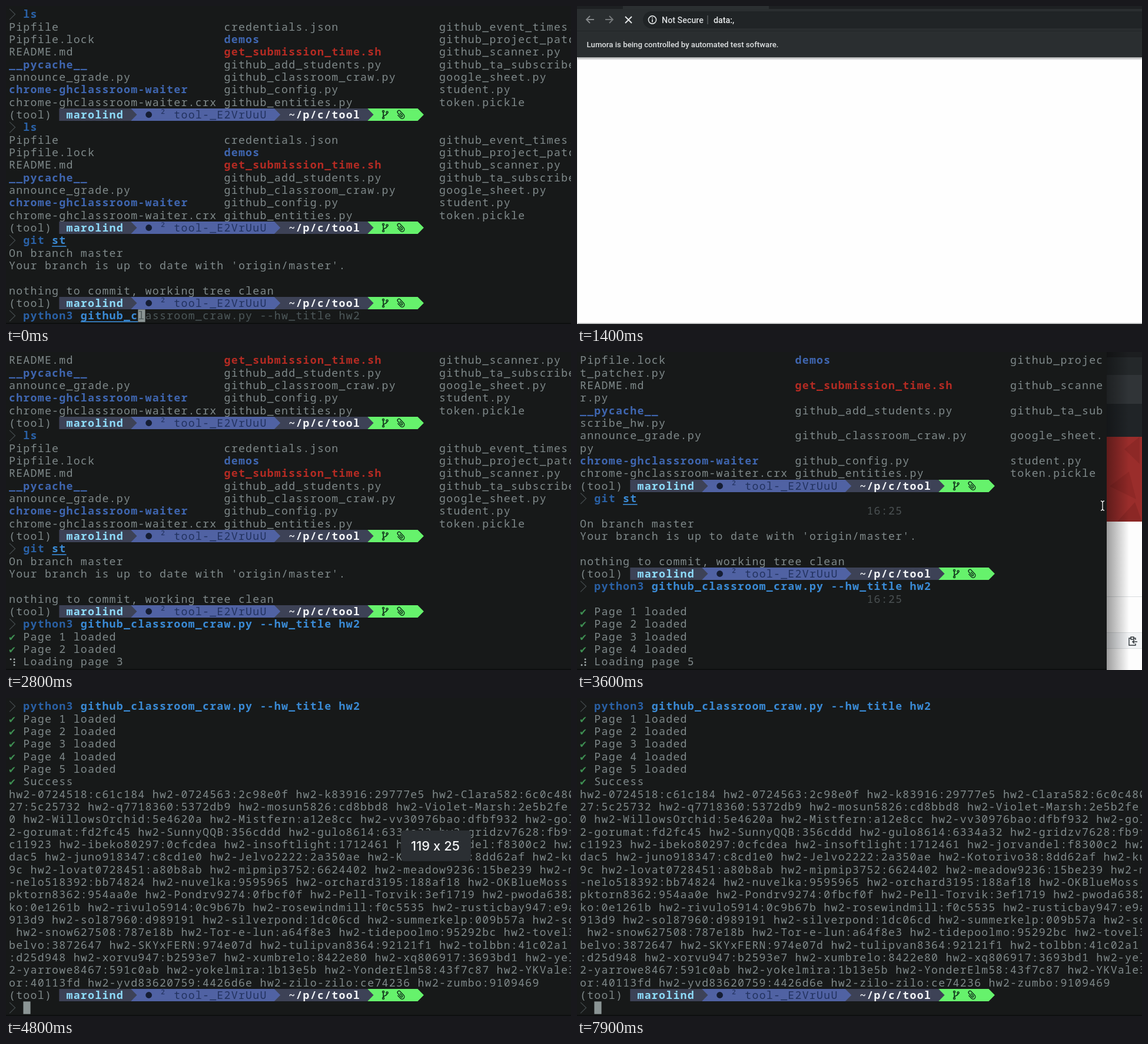
Recreate the animation shown at these times as an HTML page with a canvas. Size 960 by 540 pixels, loop 8000 ms.

```html
<!DOCTYPE html>
<html lang="en">
<head>
<meta charset="utf-8">
<title>Classroom crawl</title>
<style>
html, body { margin: 0; width: 100%; height: 100%; overflow: hidden; background: #171919; }
canvas { display: block; width: 960px; height: 540px; }
</style>
</head>
<body>
<canvas id="stage" width="960" height="540"></canvas>
<script>
const ctx = document.getElementById('stage').getContext('2d');
const LOOP = 8000, CW = 12.185, RH = 21.333, X0 = 5, Y0 = 3.35, ROWS = 25, WIDE = 119;
const MONO = '"Noto Sans Mono", "DejaVu Sans Mono", monospace';
const SANS = 'Roboto, "Liberation Sans", sans-serif';
const TIP_FONT = 'Inter, "Liberation Sans", sans-serif';
const BG = '#171919', NAVY = '#22325f', SLATE = '#3d4256', INDIGO = '#5062a3', LIME = '#66f26c';

const STYLES = {
  text: ['#7f898a', 400], dir: ['#3f66b0', 700], run: ['#b52b23', 700],
  cmd: ['#2a61a6', 700], arg: ['#3a8bd6', 700], link: ['#3a8bd6', 700],
  hint: ['#4d585a', 400], time: ['#4b5153', 400], ok: ['#3e8f52', 400]
};

// Times of the main events, in ms
const ACCEPT = 200, ENTER = 500, BROWSER_IN = 1200, BROWSER_OUT = 2100;
const PAGES = [2100, 2600, 3000, 3400, 4000];
const NARROW = 3100, DRAG = 3800, DRAG_END = 4300, DONE = 4300, TIP_OUT = 5100;

const FILES = [
  ['Pipfile', 'credentials.json', 'github_event_times.py'],
  ['Pipfile.lock', 'demos', 'github_project_patcher.py'],
  ['README.md', 'get_submission_time.sh', 'github_scanner.py'],
  ['__pycache__', 'github_add_students.py', 'github_ta_subscribe_hw.py'],
  ['announce_grade.py', 'github_classroom_craw.py', 'google_sheet.py'],
  ['chrome-ghclassroom-waiter', 'github_config.py', 'student.py'],
  ['chrome-ghclassroom-waiter.crx', 'github_entities.py', 'token.pickle']
];

const OUTPUT = `hw2-0724518:c61c184 hw2-0724563:2c98e0f hw2-k83916:29777e5 hw2-Clara582:6c0c480
27:5c25732 hw2-q7718360:5372db9 hw2-mosun5826:cd8bbd8 hw2-Violet-Marsh:2e5b2fe
0 hw2-WillowsOrchid:5e4620a hw2-Mistfern:a12e8cc hw2-vv30976bao:dfbf932 hw2-gol
2-gorumat:fd2fc45 hw2-SunnyQQB:356cddd hw2-gulo8614:6334a32 hw2-gridzv7628:fb9f
c11923 hw2-ibeko80297:0cfcdea hw2-insoftlight:1712461 hw2-jorvandel:f8300c2 hw2
dac5 hw2-juno918347:c8cd1e0 hw2-Jelvo2222:2a350ae hw2-Kotorivo38:8dd62af hw2-ku
9c hw2-lovat0728451:a80b8ab hw2-mipmip3752:6624402 hw2-meadow9236:15be239 hw2-m
-nelo518392:bb74824 hw2-nuvelka:9595965 hw2-orchard3195:188af18 hw2-OKBlueMoss:
pktorn8362:954aa0e hw2-Pondrv9274:0fbcf0f hw2-Pell-Torvik:3ef1719 hw2-pwoda6382
ko:0e1261b hw2-rivulo5914:0c9b67b hw2-rosewindmill:f0c5535 hw2-rusticbay947:e9a
913d9 hw2-sol87960:d989191 hw2-silverpond:1dc06cd hw2-summerkelp:009b57a hw2-so
 hw2-snow627508:787e18b hw2-Tor-e-lun:a64f8e3 hw2-tidepoolmo:95292bc hw2-tovel3
belvo:3872647 hw2-SKYxFERN:974e07d hw2-tulipvan8364:92121f1 hw2-tolbbn:41c02a1
:d25d948 hw2-xorvu947:b2593e7 hw2-xumbrelo:8422e80 hw2-xq806917:3693bd1 hw2-yel
2-yarrowe8467:591c0ab hw2-yokelmira:1b13e5b hw2-YonderElm58:43f7c87 hw2-YKVale3
or:40113fd hw2-yvd83620759:4426d6e hw2-zilo-zilo:ce74236 hw2-zumbo:9109469`.split('\n');

// A row is a list of parts: [column, text or draw function, style]
const plain = s => [[0, s, 'text']];
const command = (...parts) => [[0, chevron], ...parts, [113, '16:25', 'time']];
const prompt = () => [[0, drawPrompt]];

function styleOf(name) {
  if (name.endsWith('.sh')) return 'run';
  return /^(demos|__pycache__|.*-waiter)$/.test(name) ? 'dir' : 'text';
}
const listing = FILES.map(names => names.map((n, i) => [i * 30, n, styleOf(n)]));

const history = [
  command([2, 'ls', 'cmd']), ...listing, prompt(),
  command([2, 'ls', 'cmd']), ...listing, prompt(),
  command([2, 'git', 'cmd'], [6, 'st', 'link']),
  plain('On branch master'),
  plain("Your branch is up to date with 'origin/master'."),
  [], plain('nothing to commit, working tree clean'), prompt()
];

function buildRows(t) {
  const rows = history.slice();
  if (t < ACCEPT) {
    rows.push(command([2, 'python3', 'cmd'], [10, 'github_c', 'link'],
      [18, 'lassroom_craw.py --hw_title hw2', 'hint'], [18, caret('l')]));
    return rows;
  }
  const parts = [[2, 'python3', 'cmd'], [10, 'github_classroom_craw.py --hw_title hw2', 'arg']];
  if (t < ENTER) parts.push([49, caret('')]);
  rows.push(command(...parts));
  if (t < ENTER) return rows;

  const loaded = PAGES.filter(p => t >= p).length;
  for (let i = 1; i <= loaded; i++) rows.push([[0, '✔', 'ok'], [2, `Page ${i} loaded`, 'text']]);
  if (loaded < PAGES.length) {
    rows.push([[0, spinner(t)], [2, `Loading page ${loaded + 1}`, 'text']]);
  } else if (t >= DONE) {
    rows.push([[0, '✔', 'ok'], [2, 'Success', 'text']], ...OUTPUT.map(plain),
      prompt(), command([2, caret('')]));
  }
  return rows;
}

function wrap(rows, cols) {
  const out = [];
  for (const row of rows) {
    const lines = [[]];
    for (const [col, item, style] of row) {
      let c = col, rest = item;
      do {
        const n = Math.floor(c / cols), at = c % cols;
        while (lines.length <= n) lines.push([]);
        const piece = typeof rest === 'string' ? rest.slice(0, cols - at) : rest;
        lines[n].push([at, piece, style]);
        if (typeof rest !== 'string') break;
        rest = rest.slice(piece.length);
        c += piece.length;
      } while (rest);
    }
    out.push(...lines);
  }
  return out;
}

function rect(x, y, w, h, color) {
  ctx.fillStyle = color;
  ctx.fillRect(x, y, w, h);
}
function poly(points, color) {
  ctx.fillStyle = color;
  ctx.beginPath();
  points.forEach(([x, y]) => ctx.lineTo(x, y));
  ctx.fill();
}
function stroke(path, color, width) {
  ctx.strokeStyle = color;
  ctx.lineWidth = width;
  ctx.stroke(new Path2D(path));
}
function disc(x, y, r, color) {
  ctx.fillStyle = color;
  ctx.beginPath();
  ctx.arc(x, y, r, 0, 7);
  ctx.fill();
}
function label(s, x, y, size, color, family = SANS, align = 'left') {
  ctx.font = `500 ${size}px ${family}`;
  ctx.letterSpacing = '0px';
  ctx.textAlign = align;
  ctx.fillStyle = color;
  ctx.fillText(s, x, y);
}
function mono(s, x, top, color, weight) {
  ctx.textAlign = 'left';
  ctx.font = `${weight} 18.2px ${MONO}`;
  ctx.letterSpacing = '0px';
  ctx.letterSpacing = CW - ctx.measureText('0').width + 'px';
  ctx.fillStyle = color;
  ctx.fillText(s, x, top + 17);
}

function chevron(x, y) {
  stroke(`M${x + 1} ${y + 1.5}L${x + 10.5} ${y + 10.7}L${x + 1} ${y + 20}`, '#42494b', 1.3);
}
const caret = ch => (x, y) => {
  rect(x, y, CW, RH, '#8b9595');
  if (ch) mono(ch, x, y, '#4f5a5c', 400);
};
// Braille dots 1-6 as bits, column by column
const spinner = t => (x, y) => {
  const steps = [0b001011, 0b011001, 0b111001, 0b111000, 0b111100, 0b110100, 0b100110, 0b100111, 0b000111, 0b001111];
  const bits = steps[(Math.floor(t / 65) + 9) % 10];
  for (let i = 0; i < 6; i++) {
    if (bits >> i & 1) disc(x + 3 + (i > 2 ? 6 : 0), y + 6.5 + i % 3 * 4.8, 1.5, '#a2acac');
  }
};

function drawPrompt(x, y) {
  const at = c => x + c * CW, top = Math.round(y), b = Math.round(y + RH), mid = (top + b) / 2;
  const segment = (from, to, color) =>
    poly([[at(from), top], [at(to), top], [at(to + 0.85), mid], [at(to), b], [at(from), b]], color);
  mono('(tool)', x, y, STYLES.text[0], 400);
  segment(50, 57, LIME);
  segment(37, 50, SLATE);
  segment(17, 37, INDIGO);
  segment(7, 17, SLATE);
  mono('marolind', at(8), y, '#8edcfb', 700);
  disc(at(19.5), mid, 5.4, '#151d33');
  mono('²', at(21), y, NAVY, 400);
  mono('tool-_E2VrUuU', at(23), y, NAVY, 400);
  mono('~/p/c/tool', at(39), y, '#f3f5f7', 700);

  ctx.save();
  ctx.translate(at(52.45), mid);
  stroke('M-3 -4V4M3.5 -3C3.5 2 -3 0 -3 4', '#12351c', 1.7);
  for (const [dx, dy] of [[-3, -5.5], [-3, 5.5], [3.5, -4]]) {
    disc(dx, dy, 2.3, '#12351c');
    disc(dx, dy, 0.8, LIME);
  }
  ctx.translate(at(54.6) - at(52.45), 0);
  ctx.rotate(-0.75);
  stroke('M-3.8 -3V4A3.8 3.8 0 0 0 3.8 4V-5A2.6 2.6 0 0 0 -1.4 -5V3A1.3 1.3 0 0 0 1.3 3V-3', '#12351c', 1.5);
  ctx.restore();
}

function drawTerminal(t, width) {
  const cols = Math.min(WIDE, Math.floor((width - 10) / CW + 0.1));
  rect(0, 0, width, 540, BG);
  rect(0, 538, width, 2, '#0d0f0f');
  wrap(buildRows(t), cols).slice(-ROWS).forEach((line, i) => {
    const y = Y0 + i * RH;
    for (const [col, item, style] of line) {
      const x = X0 + col * CW;
      if (typeof item === 'function') { item(x, y); continue; }
      const [color, weight] = STYLES[style];
      mono(item, x, y, color, weight);
      if (style === 'link') rect(x, y + 20, item.length * CW, 1.6, color);
    }
  });
  return cols;
}

function drawBehind(edge) {
  rect(0, 0, 960, 540, '#fdfdfd');
  rect(0, 0, 960, 9, '#1c1e20');
  rect(0, 9, 960, 79, '#303437');
  rect(0, 9, 960, 30, '#24282a');
  rect(0, 88, 960, 56, '#202427');
  rect(0, 144, 960, 144, '#9a2d2b');
  poly([[930, 165], [956, 144], [956, 190]], '#8d2826');
  poly([[905, 228], [938, 203], [950, 250]], '#8f2826');
  poly([[918, 288], [948, 255], [960, 288]], '#8b2725');
  for (const y of [415, 476, 503]) rect(0, y, 960, 1, '#d9dcde');
  rect(0, 477, 960, 26, '#f2f4f6');
  stroke('M942 486H938V498H949V495M945 486H949V489M941 484H946V488H941ZM952 492H944M947 489L944 492L947 495', '#30363a', 1.4);
  const shade = ctx.createLinearGradient(edge, 0, edge + 38, 0);
  shade.addColorStop(0, 'rgba(0,0,0,.38)');
  shade.addColorStop(1, 'rgba(0,0,0,0)');
  ctx.fillStyle = shade;
  ctx.fillRect(edge, 0, 38, 540);
}

function drawPointer(x, y) {
  const d = `M${x - 3} ${y - 8}Q${x} ${y - 8} ${x} ${y - 5}V${y + 5}Q${x} ${y + 8} ${x - 3} ${y + 8}` +
    `M${x + 3} ${y - 8}Q${x} ${y - 8} ${x} ${y - 5}M${x} ${y + 5}Q${x} ${y + 8} ${x + 3} ${y + 8}`;
  stroke(d, '#111', 3);
  stroke(d, '#e8eaea', 1.4);
}

function drawTip(cols, width) {
  const x = width / 2;
  ctx.fillStyle = '#2b2f33';
  ctx.beginPath();
  ctx.roundRect(x - 59, 225, 119, 52, 5);
  ctx.fill();
  label(`${cols} x ${ROWS}`, x - 0.5, 259, 22, '#f2f4f5', TIP_FONT, 'center');
}

function drawBrowser() {
  rect(0, 0, 960, 540, '#fefefe');
  rect(0, 0, 960, 5, '#1d2022');
  rect(78, 0, 248, 5, '#2b2f31');
  rect(0, 5, 960, 82, '#2a2e30');
  ctx.fillStyle = '#202426';
  ctx.beginPath();
  ctx.roundRect(112, 9, 900, 29, 14.5);
  ctx.fill();
  rect(0, 42, 960, 1, '#212527');
  const shade = ctx.createLinearGradient(0, 87, 0, 92);
  shade.addColorStop(0, '#a5a7a8');
  shade.addColorStop(1, '#fefefe');
  ctx.fillStyle = shade;
  ctx.fillRect(0, 87, 960, 5);
  rect(0, 538.5, 960, 1.5, '#a9abac');
  rect(0, 87, 1, 453, '#dcdde0');

  stroke('M29 23H16M22 17L16 23L22 29', '#85898b', 1.8);
  stroke('M48 23H61M55 17L61 23L55 29', '#74787a', 1.8);
  stroke('M82 18L93 29M93 18L82 29', '#e6e8e9', 1.9);
  ctx.strokeStyle = '#dfe2e3';
  ctx.lineWidth = 1.6;
  ctx.beginPath();
  ctx.arc(128, 23.5, 6.6, 0, 7);
  ctx.stroke();
  rect(127.2, 22.5, 1.7, 5, '#dfe2e3');
  rect(127.2, 19.4, 1.7, 1.7, '#dfe2e3');
  label('Not Secure', 144, 28.5, 14.3, '#dadddf');
  rect(221.5, 16, 1, 15, '#717679');
  label('data:,', 232, 28.5, 14.3, '#e8eaeb');
  label('Lumora is being controlled by automated test software.', 16.5, 70, 13.2, '#dfe2e3');
}

function windowWidth(t) {
  if (t < NARROW || t >= DRAG_END) return 1460;
  if (t < DRAG) return 900;
  const p = (t - DRAG) / (DRAG_END - DRAG);
  return 900 + 560 * p * p * (3 - 2 * p);
}

function draw(t) {
  if (t >= BROWSER_IN && t < BROWSER_OUT) return drawBrowser();
  const width = windowWidth(t);
  if (width < 960) drawBehind(width);
  const cols = drawTerminal(t, width);
  if (t >= DRAG && t < TIP_OUT) drawTip(cols, width);
  if (t >= NARROW && t < DRAG_END) drawPointer(width - 7, 261);
}

function tick() {
  draw(performance.now() % LOOP);
  requestAnimationFrame(tick);
}
tick();
</script>
</body>
</html>
```
